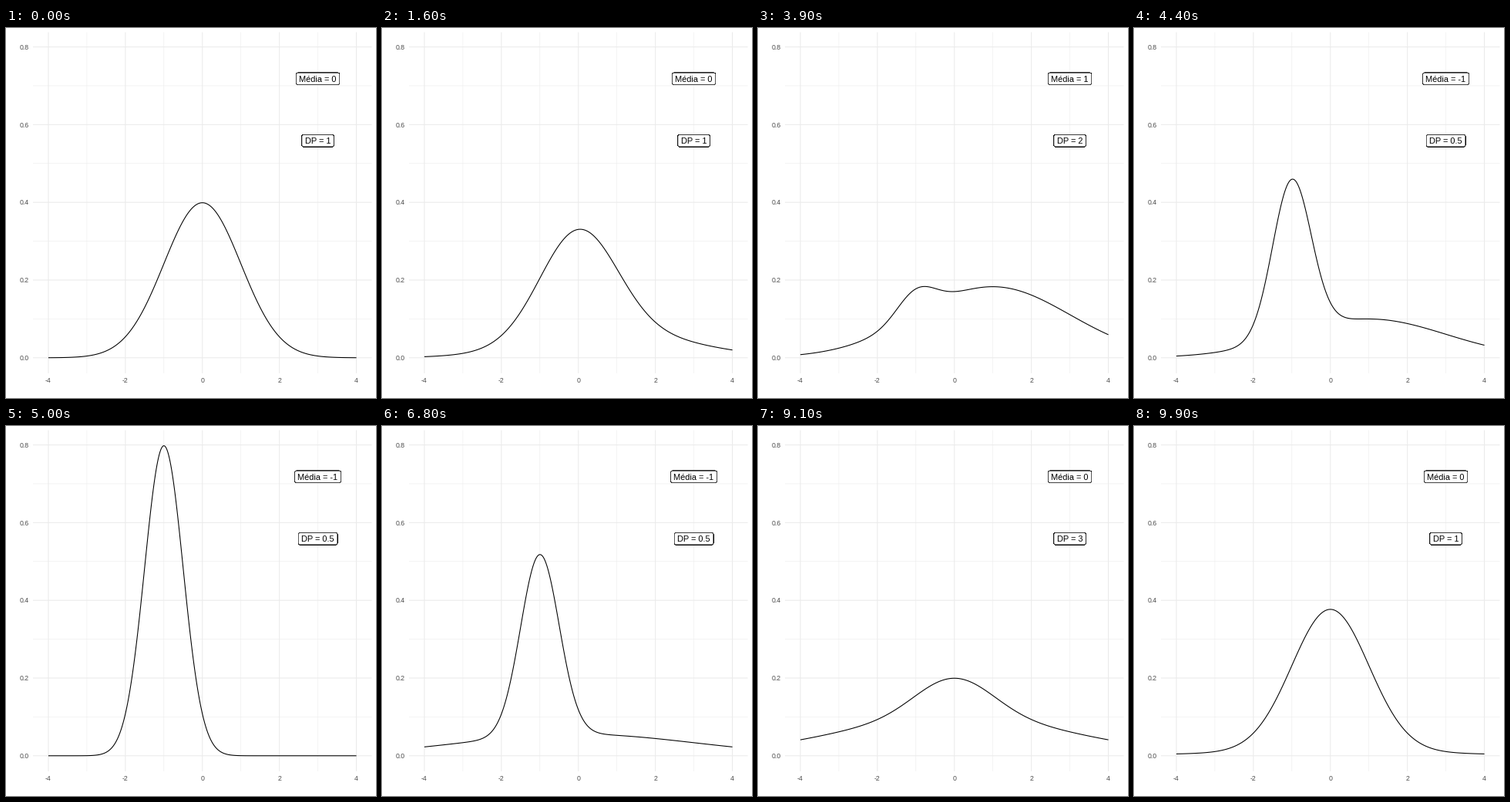
A matplotlib script that plays this animation: 480x480 px, repeating every 10 s.

```python
import numpy as np
import matplotlib.pyplot as plt
from matplotlib.animation import FuncAnimation
from matplotlib.collections import PatchCollection
from matplotlib.patches import FancyBboxPatch

SIZE, DPI = 480, 100
PX = 72 / DPI                                   # points per pixel
LEFT, RIGHT, TOP, BOTTOM = 35.0, 474.5, 5.5, 447.9
X_LIM = (-4.4, 4.4)
PEAK = 1 / (0.5 * np.sqrt(2 * np.pi))
Y_LIM = (-0.05 * PEAK, 1.05 * PEAK)

# (mean, standard deviation) and the frames between which each state turns into the next
STATES = [(0, 1), (1, 2), (-1, 0.5), (0, 3)]
MOVES = [(12, 25), (38, 50), (63, 75), (88, 100)]
FRAMES, INTERVAL = 100, 100

# Glyph advances in em, used to centre text and size the label boxes
ADVANCE = {"M": .833, "D": .722, "P": .667, "i": .222, " ": .278,
           ".": .278, "=": .584, "-": .333}

plt.rcParams["font.family"] = "Liberation Sans"
plt.rcParams["path.simplify"] = False

fig = plt.figure(figsize=(SIZE / DPI, SIZE / DPI), dpi=DPI, facecolor="white")
ax = fig.add_axes([0, 0, 1, 1])
ax.set(xlim=(0, SIZE), ylim=(SIZE, 0))
ax.axis("off")


def px(x):
    return LEFT + (x - X_LIM[0]) / (X_LIM[1] - X_LIM[0]) * (RIGHT - LEFT)


def py(y):
    return BOTTOM - (y - Y_LIM[0]) / (Y_LIM[1] - Y_LIM[0]) * (BOTTOM - TOP)


def text_width(text, size):
    return size * sum(ADVANCE.get(c, .556) for c in text)


def draw_text(x, baseline, text, size, color, align=0.5):
    left = x - align * text_width(text, size)
    return ax.text(left, baseline, text, size=size * PX, color=color,
                   ha="left", va="baseline")


def draw_grid(xs, ys, width):
    style = dict(color="#EBEBEB", lw=width * PX, zorder=0, snap=False,
                 solid_capstyle="butt")
    for y in ys:
        ax.plot([LEFT, RIGHT], [py(y)] * 2, **style)
    for x in xs:
        ax.plot([px(x)] * 2, [TOP, BOTTOM], **style)


def draw_label(y, text):
    size, pad, height = 11.04, 3.6, 15.2
    width = text_width(text, size) + 2 * pad
    box = FancyBboxPatch((px(3) - width / 2, py(y) - height / 2), width, height,
                         boxstyle="round,pad=0,rounding_size=2.16")
    # Stacked copies darken the thin antialiased border
    boxes = PatchCollection([box] * 40, facecolor="white", edgecolor="black",
                            linewidth=0.53 * PX)
    ax.add_collection(boxes, autolim=False)
    return [boxes, draw_text(px(3), round(py(y) + 4), text, size, "black")]


def density(mean, sd):
    return np.exp(-((xs - mean) / sd) ** 2 / 2) / (sd * np.sqrt(2 * np.pi))


x_ticks = range(-4, 5, 2)
y_ticks = np.arange(5) * 0.2
draw_grid(range(-3, 4, 2), y_ticks[:4] + 0.1, 0.53)
draw_grid(x_ticks, y_ticks, 1.07)
for x in x_ticks:
    draw_text(px(x), 460, str(x), 8.8, "#4D4D4D")
for y in y_ticks:
    draw_text(30.07, py(y) + 3.2, f"{y:.1f}", 8.8, "#4D4D4D", align=1)

xs = np.linspace(-4, 4, 401)
curves = [density(*state) for state in STATES]
labels = [draw_label(0.9 * PEAK, f"Média = {mean}") +
          draw_label(0.7 * PEAK, f"DP = {sd}") for mean, sd in STATES]
curve, = ax.plot(px(xs), py(curves[0]), color="black", lw=1.07 * PX,
                 solid_capstyle="butt", solid_joinstyle="round", snap=False)


def update(frame):
    current, t = 0, 0
    for k, (start, end) in enumerate(MOVES):
        if frame > start:
            current, t = k, min((frame - start) / (end - start), 1)
    following = (current + 1) % len(STATES)
    curve.set_ydata(py((1 - t) * curves[current] + t * curves[following]))
    shown = following if t >= 0.5 else current
    for k, artists in enumerate(labels):
        for artist in artists:
            artist.set_visible(k == shown)
    return [curve]


update(0)
anim = FuncAnimation(fig, update, frames=FRAMES, interval=INTERVAL,
                     repeat=True, repeat_delay=0, blit=False)
plt.show()
```
